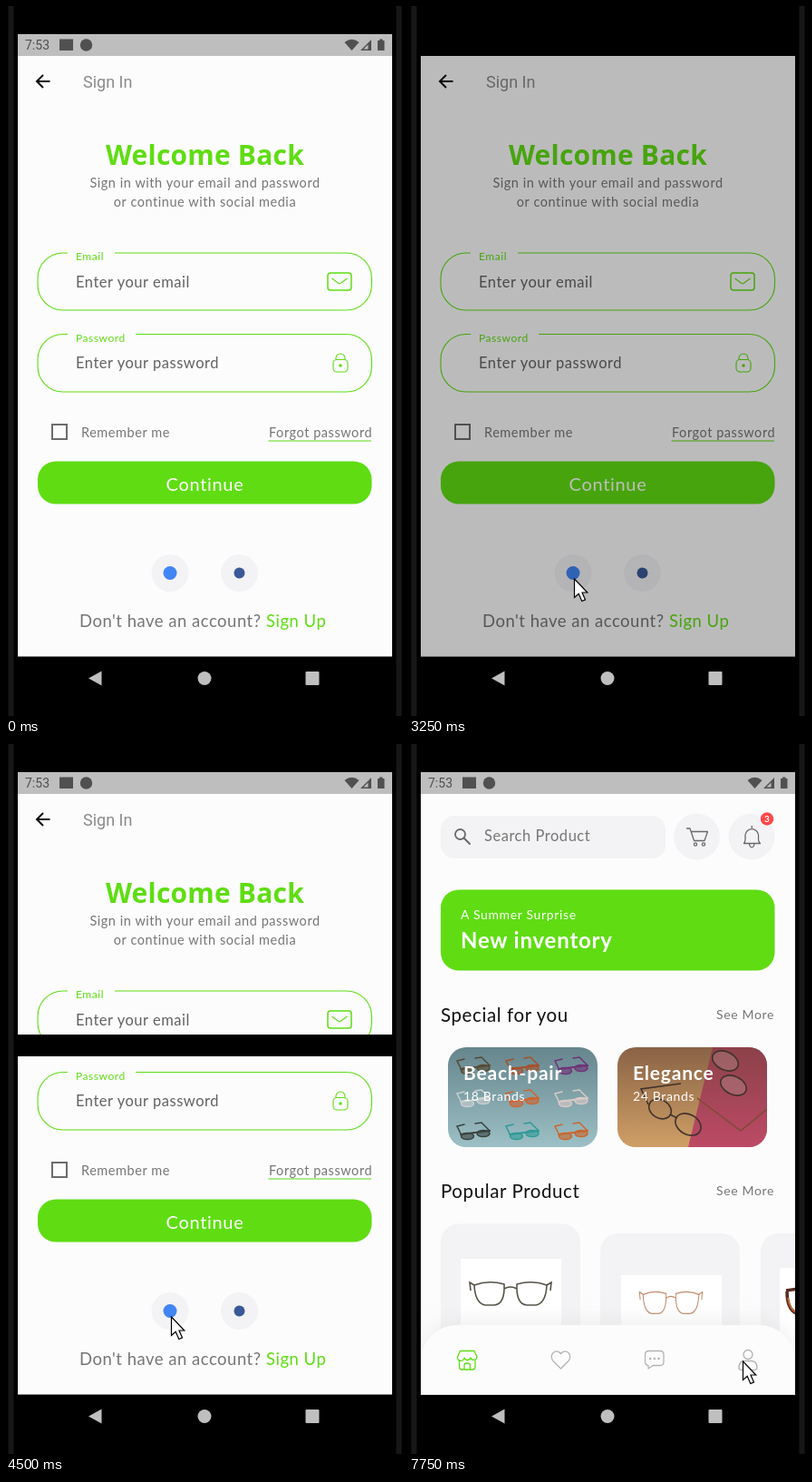
Animation, 438 px wide and 782 px high, one loop 8000 ms. Source, as an HTML page:

```html
<!DOCTYPE html>
<html lang="en">
<head>
<meta charset="utf-8">
<title>Sign in flow</title>
<style>
  html, body { margin: 0; width: 100%; height: 100%; overflow: hidden; background: #000; }
  svg { display: block; width: 100vw; height: 100vh; }
  text { font-family: Lato, "Open Sans", sans-serif; }
  .roboto { font-family: Roboto, "Liberation Sans", sans-serif; letter-spacing: 0; }
  .mid { text-anchor: middle; }
  .hero { font: 700 30px "Open Sans", Lato, sans-serif; letter-spacing: .2px; }
  .banner { font-size: 24px; font-weight: 700; letter-spacing: .8px; }
  .card { font-size: 21px; font-weight: 700; letter-spacing: .8px; }
  .head { font-size: 20.5px; letter-spacing: .6px; }
  .btn { font-size: 20px; letter-spacing: .7px; }
  .ask { font-size: 18.5px; letter-spacing: .5px; }
  .input { font-size: 16.5px; letter-spacing: .53px; }
  .body { font-size: 14.5px; letter-spacing: .55px; }
  .small { font-size: 14px; letter-spacing: .65px; }
  .label { font-size: 12px; letter-spacing: .55px; }
  .grey { fill: #767676; }
  .dark { fill: #626262; }
  .green { fill: #5fdd12; }
  .white { fill: #fff; }
  .soft { fill: #f3f3f5; }
  .page { fill: #fcfcfd; }
  .line { fill: none; stroke: #5fdd12; stroke-width: 1.1; }
  .icon { fill: none; stroke: #6a6a6a; stroke-width: 1.3; stroke-linecap: round; stroke-linejoin: round; }
  .pale { stroke: #b4b4b4; }
</style>
</head>
<body>
<svg viewBox="0 0 438 782" preserveAspectRatio="none">
  <defs>
    <clipPath id="screen"><rect x="13" y="55" width="413" height="661.5"/></clipPath>
    <clipPath id="cardA"><rect x="43" y="334" width="165" height="110" rx="20"/></clipPath>
    <clipPath id="cardB"><rect x="230" y="334" width="165" height="110" rx="20"/></clipPath>
    <linearGradient id="sea" x2="0" y2="1">
      <stop stop-color="#66858d"/><stop offset="1" stop-color="#9cc0c5"/>
    </linearGradient>
    <linearGradient id="tan" x2="0" y2="1">
      <stop stop-color="#8a6346"/><stop offset="1" stop-color="#cf9f66"/>
    </linearGradient>
    <linearGradient id="red" x2="0" y2="1">
      <stop stop-color="#8c4149"/><stop offset="1" stop-color="#bd4a66"/>
    </linearGradient>
    <filter id="shadow" x="-10%" y="-40%" width="120%" height="190%">
      <feDropShadow dx="0" dy="3" stdDeviation="3" flood-color="#444" flood-opacity=".45"/>
    </filter>
    <filter id="lift" x="-10%" y="-40%" width="120%" height="190%">
      <feDropShadow dx="0" dy="-8" stdDeviation="9" flood-color="#dadada" flood-opacity=".35"/>
    </filter>
    <g id="shades" stroke="currentColor" stroke-linecap="round">
      <path d="M-16 1 L-20 -7 L-12 -9 M16 -2 L7 -11 L0 -10" fill="none" stroke-width="1.500"/>
      <g fill="currentColor" fill-opacity=".6" stroke-width="1.500">
        <ellipse cx="-8.500" cy="4" rx="7" ry="3.600"/>
        <ellipse cx="9" cy="1" rx="7" ry="3.600"/>
      </g>
      <path d="M-16 2 L16 -2" stroke-width="2"/>
    </g>
    <g id="specs" fill="none" stroke="currentColor">
      <path d="M-40 -8 Q-24 -14 -7 -9 Q-6 13 -18 14 H-28 Q-39 12 -40 -8Z M40 -8 Q24 -14 7 -9 Q6 13 18 14 H28 Q39 12 40 -8Z"/>
      <path d="M-7 -4 Q0 -8 7 -4 M-40 -8 L-45 -11 L-44 -2 M40 -8 L45 -11 L44 -2"/>
    </g>
  </defs>

  <rect width="438" height="782"/>
  <path d="M5.500 0 V782 M433.500 0 V782" stroke="#171715" stroke-width="6"/>

  <g clip-path="url(#screen)">
    <g id="login">
      <rect class="page" x="13" y="55" width="413" height="662"/>
      <path d="M48.500 83 H34.500 M41 76 L34 83 L41 90" fill="none" stroke="#111" stroke-width="2"/>
      <text class="roboto" x="85" y="89.500" font-size="18" fill="#8b8b8b">Sign In</text>
      <text class="hero green mid" x="219.500" y="174.500">Welcome Back</text>
      <text class="body grey mid" x="219.500" y="199.500">Sign in with your email and password</text>
      <text class="body grey mid" x="219.500" y="220.500">or continue with social media</text>

      <rect class="line" x="35" y="272" width="368.500" height="63" rx="28"/>
      <rect class="page" x="68" y="268" width="52" height="8"/>
      <text class="label green" x="77" y="280">Email</text>
      <text class="input dark" x="77" y="309.500">Enter your email</text>
      <g class="line" stroke-linejoin="round">
        <rect x="355" y="294" width="26" height="19" rx="3" stroke-width="1.500"/>
        <path d="M359.500 300 L367 305.500 Q368 306 369 305.500 L376.500 300"/>
      </g>

      <rect class="line" x="35" y="361.500" width="368.500" height="63.500" rx="28"/>
      <rect class="page" x="68" y="358" width="75" height="8"/>
      <text class="label green" x="77" y="369.500">Password</text>
      <text class="input dark" x="77" y="399">Enter your password</text>
      <g class="line">
        <rect x="361" y="389.500" width="16" height="13.500" rx="4"/>
        <path d="M364 389.500 V388 A5 5 0 0 1 374 388 V389.500"/>
      </g>
      <circle class="green" cx="369" cy="396" r="1.800"/>

      <rect x="51" y="461" width="16" height="16" fill="none" stroke="#6c6c6c" stroke-width="2"/>
      <text class="body grey" x="83" y="474.500">Remember me</text>
      <text class="body grey" x="290" y="474.500">Forgot password</text>
      <path class="line" d="M289.500 479 H403"/>
      <rect class="green" x="35" y="501.500" width="368.500" height="47" rx="20"/>
      <text class="btn white mid" x="219.500" y="533.500">Continue</text>

      <circle class="soft" cx="181" cy="624.500" r="20.500"/>
      <circle cx="181" cy="624.500" r="7.500" fill="#4285f4"/>
      <circle class="soft" cx="257.500" cy="624.500" r="20.500"/>
      <circle cx="257.500" cy="624.500" r="6" fill="#3b5998"/>
      <text class="ask grey" x="81" y="683.500">Don't have an account?</text>
      <text class="ask green" x="287" y="683.500">Sign Up</text>
    </g>

    <g id="snack">
      <rect class="green" x="28" y="658.500" width="382.500" height="48.500" rx="4" filter="url(#shadow)"/>
      <text class="roboto white" x="44" y="687.500" font-size="14">Welcome back, Tuen</text>
      <text class="small white" x="325" y="688">Continue</text>
    </g>

    <g id="home">
      <rect class="page" x="13" y="55" width="413" height="662"/>
      <rect class="soft" x="35" y="79" width="248" height="47" rx="15"/>
      <g class="icon">
        <circle cx="56.500" cy="99.500" r="5.500" stroke-width="1.800"/>
        <path d="M60.500 103.500 L67 110" stroke-width="1.900"/>
      </g>
      <text class="input grey" x="83" y="107">Search Product</text>
      <circle class="soft" cx="317.500" cy="102" r="25.500"/>
      <path class="icon" d="M306.500 93 H310 L314.500 106.500 H326 L329.500 96.500 H311.500"/>
      <circle class="icon" cx="316" cy="110.500" r="1.600"/>
      <circle class="icon" cx="325" cy="110.500" r="1.600"/>
      <circle class="soft" cx="378" cy="102" r="25.500"/>
      <path class="icon" d="M369.500 109.500 Q371 108 371 105 V100 A7.300 7.300 0 0 1 385.500 100 V105 Q385.500 108 387.500 109.500Z M378.200 92.500 V90.500 M375.500 110 Q376 113.800 378.200 113.800 T381 110"/>
      <circle class="page" cx="395" cy="82.500" r="8"/>
      <circle cx="395" cy="82.500" r="7.200" fill="#ff4848"/>
      <text class="mid white" x="395" y="86" font-size="10" font-weight="700">3</text>

      <rect class="green" x="35" y="160.500" width="368.500" height="89" rx="20"/>
      <text class="small white" x="57" y="193">A Summer Surprise</text>
      <text class="banner white" x="57" y="225">New inventory</text>

      <text class="head" x="35" y="306" fill="#111">Special for you</text>
      <text class="small grey" x="339" y="303">See More</text>

      <g clip-path="url(#cardA)">
        <rect x="43" y="334" width="165" height="110" fill="url(#sea)"/>
        <g id="rack"></g>
      </g>
      <text class="card white" x="60" y="370">Beach-pair</text>
      <text class="small white" x="60" y="393">18 Brands</text>

      <g clip-path="url(#cardB)">
        <rect x="230" y="334" width="165" height="110" fill="url(#tan)"/>
        <path d="M335 334 H395 V444 H308Z" fill="url(#red)"/>
        <g fill="none" stroke="#41322c" stroke-width="1.600">
          <g fill="#b6a79c" fill-opacity=".3">
            <ellipse cx="349" cy="349" rx="15" ry="10" transform="rotate(25 349 349)"/>
            <ellipse cx="358" cy="376" rx="15" ry="10" transform="rotate(25 358 376)"/>
          </g>
          <ellipse cx="277" cy="402" rx="13" ry="10" transform="rotate(30 277 402)"/>
          <ellipse cx="308" cy="419" rx="15" ry="11" transform="rotate(30 308 419)"/>
          <path d="M288 408 L296 412 M264 397 L256 380 L300 374"/>
          <path d="M318 390 L366 426 L395 402" stroke="#7c4b31" stroke-width="1.400"/>
        </g>
      </g>
      <text class="card white" x="247" y="370">Elegance</text>
      <text class="small white" x="247" y="393">24 Brands</text>

      <text class="head" x="35" y="500" fill="#111">Popular Product</text>
      <text class="small grey" x="339" y="497">See More</text>
      <g class="soft">
        <rect x="35" y="528.500" width="154" height="160" rx="20"/>
        <rect x="211" y="539" width="154" height="150" rx="20"/>
        <rect x="388" y="539" width="154" height="150" rx="20"/>
      </g>
      <path class="white" d="M57 567 H168 V680 H57Z M234 585 H345 V680 H234Z M409 577 H440 V680 H409Z"/>
      <use href="#specs" x="112" y="604" color="#555248" stroke-width="1.600"/>
      <g transform="translate(289 614) scale(.77 .95)">
        <use href="#specs" color="#c48a6a" stroke-width="1.300"/>
      </g>
      <path d="M416 602 L430 600 M417 603 Q417 625 430 628" fill="none" stroke="#5b2b20" stroke-width="3.500"/>
      <path d="M418 610 Q420 623 427 626" fill="none" stroke="#d8702c" stroke-width="1.500"/>

      <path class="page" d="M13 717 V680 A40 40 0 0 1 53 640 H386 A40 40 0 0 1 426 680 V717Z" filter="url(#lift)"/>
      <g class="icon" style="stroke:#5fdd12">
        <path d="M56.500 668.500 H72 L75 675 A3.600 3.600 0 0 1 68 676 A3.700 3.700 0 0 1 61 676 A3.600 3.600 0 0 1 53.500 675Z"/>
        <path d="M55.500 679 V686 Q55.500 689 58.500 689 H70 Q73 689 73 686 V679 M61 689 V684 Q61 682 64.200 682 T67.500 684 V689"/>
      </g>
      <path class="icon pale" d="M167.500 688 L159 679.500 C153.500 673 162 664.500 167.500 671.500 C173 664.500 181.500 673 176 679.500Z"/>
      <path class="icon pale" d="M264.500 668.500 H277 Q281 668.500 281 672.500 V680.500 Q281 684.500 277 684.500 H269 L264 688 V684.500 Q260.500 684 260.500 680.500 V672.500 Q260.500 668.500 264.500 668.500Z"/>
      <path class="icon pale" d="M266 677 h.2 M270.700 677 h.2 M275.400 677 h.2" style="stroke-width:2.500"/>
      <circle class="icon pale" cx="374" cy="672.500" r="5"/>
      <path class="icon pale" d="M364 687 Q364 680 370 679.500 H378 Q384 680 384 687 Q384 689.500 381 689.500 H367 Q364 689.500 364 687Z"/>
    </g>
  </g>

  <g id="status">
    <rect x="13" y="31" width="413" height="24" fill="#bebebe"/>
    <g fill="#505050">
      <text class="roboto" x="21" y="48" font-size="14">7:53</text>
      <rect x="59" y="36.500" width="15" height="12.500"/>
      <circle cx="88.500" cy="43" r="6.700"/>
      <path d="M373.500 40 Q381.500 33.500 389.500 40 L381.500 49Z M391 49 L403 37 V49Z M410 38 H412 V36.500 H415.500 V38 H417.500 V49 H410Z"/>
    </g>
    <path d="M394.500 47.500 L399.500 42.500 V47.500Z" fill="#bebebe"/>
  </g>
  <rect id="dim" x="13" y="55" width="413" height="661.500"/>
  <rect id="band" x="13" y="320" width="413" height="24"/>

  <g fill="#bfbfbf">
    <path d="M91 740.500 L105.500 732.500 V748.500Z"/>
    <circle cx="219" cy="740.500" r="7.500"/>
    <rect x="330.500" y="733" width="15" height="15" rx="1"/>
  </g>
  <path id="cursor" d="M0 0 V20.500 L4.700 16.200 L8.300 24.500 L12 22.900 L8.500 15 H14.300Z" fill="#fff" stroke="#000" stroke-width="1.200"/>
</svg>

<script>
const $ = id => document.getElementById(id);
const LOOP = 8000;

// Small shades laid out on the first card, three to a row.
const tints = ['#544b35', '#a5512a', '#703277', '#c9cfd0', '#cf6530', '#d9c9c8', '#39423f', '#2f9a98', '#c9672c'];
$('rack').innerHTML = tints.map((c, i) => {
  const x = 73 + i % 3 * 54, y = 356 + Math.floor(i / 3) * 36;
  return `<use href="#shades" x="${x}" y="${y}" color="${c}"/>`;
}).join('');

// Each step holds until the next; fields left out keep their value.
const steps = [
  { at: 0, pos: null, dim: 0, band: 0, snack: 0, home: 0 },
  { at: 750, pos: [283, 676] },
  { at: 1000, pos: [258, 390] },
  { at: 1250, pos: [181, 517] },
  { at: 1500, pos: [183, 580] },
  { at: 1750, pos: [189, 634] },
  { at: 2000, pos: [184, 632] },
  { at: 2250, pos: [182.5, 631] },
  { at: 3250, dim: .26 },
  { at: 3500, dim: .53 },
  { at: 3750, dim: .56 },
  { at: 4500, dim: 0, band: 1 },
  { at: 4750, band: 0 },
  { at: 5000, snack: .5 },
  { at: 5250, snack: 1 },
  { at: 5750, pos: [181, 645] },
  { at: 6000, pos: [254, 678] },
  { at: 6250, pos: [364, 678] },
  { at: 6500, pos: [368.5, 680] },
  { at: 7250, snack: 0, home: .9 },
  { at: 7500, home: 1 }
];

const show = (id, alpha) => $(id).setAttribute('opacity', +alpha);

function draw(t) {
  const s = Object.assign({}, ...steps.filter(step => step.at <= t));
  show('cursor', !!s.pos);
  if (s.pos) $('cursor').setAttribute('transform', `translate(${s.pos})`);
  show('status', !s.dim);
  for (const id of ['dim', 'band', 'snack', 'home']) show(id, s[id]);
}

const start = performance.now();
function tick() {
  draw((performance.now() - start) % LOOP);
  requestAnimationFrame(tick);
}
tick();
</script>
</body>
</html>
```
